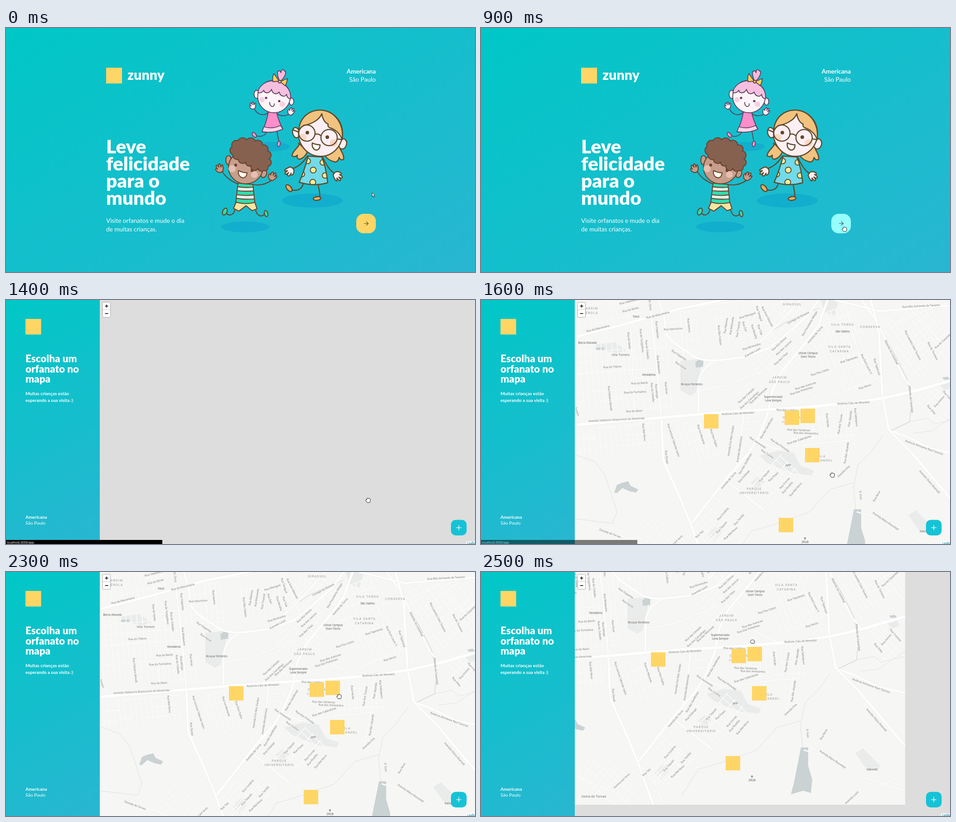
Animation, 1035 px wide and 541 px high, one loop 8 s. Source, as an HTML page:

```html
<!DOCTYPE html>
<html lang="pt-BR">
<head>
<meta charset="utf-8">
<title>Orfanatos</title>
<style>
html, body { margin: 0; width: 100%; height: 100%; overflow: hidden; }
body, #side { background: linear-gradient(329.54deg, #29b6d1 0%, #00c7c7 100%); }
svg, #app { position: absolute; left: 0; top: 0; width: 1035px; height: 541px; overflow: hidden; }
#app { background: #ddd; }
#side { position: absolute; left: 0; top: 0; width: 207px; height: 541px; }
text { font-family: Lato, sans-serif; fill: #fff; }
.title { font-weight: 900; }
.bold { font-weight: 700; }
.end { text-anchor: end; }
.kid { stroke-linecap: round; stroke-linejoin: round; }
.kid .line { fill: none; }
.flat { stroke: none; }
#map text { font: 6.3px Roboto, sans-serif; fill: #888; text-anchor: middle; paint-order: stroke; stroke: #f6f6f4; stroke-width: 1.4px; }
#map .area { font-size: 7px; letter-spacing: 1.2px; fill: #999; }
#map .place { fill: #666; }
#map .town { font-size: 7.8px; fill: #777; }
#roads, #paths { fill: none; stroke-linejoin: round; stroke-linecap: round; }
</style>
</head>
<body>
<svg id="landing" viewBox="0 0 1035 541">
  <defs>
    <path id="hand" vector-effect="non-scaling-stroke" d="M-3 8C-8 6-10 0-9-3C-8-6-5-4-5-2C-6-8-4-11-2-10C0-9 0-5 0-4C1-10 4-12 5-9C6-7 4-4 4-2C7-6 10-6 9-3C8 1 5 6 3 8Z"/>
    <clipPath id="dress"><path d="M667 284L697 286C704 303 708 325 710 343Q680 352 647 342C657 320 662 302 667 284Z"/></clipPath>
    <clipPath id="shirt"><path d="M512 344L545 347L549 387Q528 392 507 386Z"/></clipPath>
  </defs>

  <rect x="221" y="88" width="35" height="35" fill="#ffd666"/>
  <text class="title" x="268" y="115" font-size="30.3">zunny</text>
  <text class="bold end" x="816" y="101" font-size="13.5">Americana</text>
  <text class="end" x="816" y="119" font-size="13.7">São Paulo</text>
  <g class="title" font-size="42.2">
    <text x="221" y="278">Leve</text><text x="221" y="316">felicidade</text>
    <text x="221" y="354">para o</text><text x="221" y="392">mundo</text>
  </g>
  <g font-size="13.5">
    <text x="221" y="432">Visite orfanatos e mude o dia</text>
    <text x="221" y="450.5">de muitas crianças.</text>
  </g>

  <g fill="#12aecd">
    <ellipse cx="583" cy="263" rx="43" ry="10.5"/>
    <ellipse cx="676" cy="382.5" rx="67" ry="15.5"/>
    <ellipse cx="528" cy="441" rx="53" ry="12"/>
  </g>

  <g class="kid" stroke="#5f3f5e" stroke-width="1.8" fill="#fdf5f8">
    <path class="line" d="M579 187C570 196 556 193 549 181M597 189C606 197 617 195 625 191M575 231C571 240 560 242 553 239M598 230L602 251"/>
    <g fill="#fb9dd0">
      <ellipse cx="548" cy="237" rx="3.5" ry="6.5" transform="rotate(-38 548 237)"/>
      <ellipse cx="602" cy="257" rx="3.2" ry="6" transform="rotate(10 602 257)"/>
    </g>
    <use href="#hand" transform="translate(545 173) rotate(-25) scale(.8)"/>
    <use href="#hand" transform="translate(629 186) rotate(20) scale(.8 .9)"/>
    <path fill="#ff8ecb" d="M579 186L597 187Q602 208 611 224Q590 234 565 230Q575 210 579 186Z"/>
    <path fill="#fbd6ea" d="M569 219Q588 225 606 216L611 224Q590 234 565 230Z"/>
    <ellipse cx="553" cy="147" rx="5.5" ry="9"/><ellipse cx="630" cy="163" rx="5" ry="8"/>
    <path fill="#f9b8dd" d="M603 116C599 106 597 96 602 95C605 94 606 97 607 99C607 92 612 90 614 95C618 95 618 101 615 106C613 111 609 115 606 118Z"/>
    <circle cx="591.5" cy="152" r="36"/>
    <path fill="#f5bfe0" d="M556 143C558 127 575 116 593 117C615 119 630 137 628 157C622 157 620 153 619 147C616 154 605 152 603 142C596 149 588 146 586 136C580 147 570 145 569 138Q563 146 556 143Z"/>
    <path fill="#ffd152" d="M603 118L591 101C588 108 588 113 589 119ZM605 119L621 112C620 119 619 124 616 128Z"/>
    <circle cx="604" cy="119" r="3" fill="#ffd152"/>
    <g class="flat" fill="#f9cfe0"><circle cx="565" cy="159" r="5.8"/><circle cx="610" cy="169" r="6"/></g>
    <g class="flat" fill="#5f3f5e"><circle cx="574" cy="155" r="2.6"/><circle cx="603" cy="162" r="2.6"/></g>
    <path class="line" d="M582 165C581 176 593 177 592 168"/>
  </g>

  <g class="kid" stroke="#5f4a2b" stroke-width="2.5" fill="#fdeff3">
    <path class="line" d="M665 284C658 296 645 308 634 311M699 287C706 302 715 316 724 322M656 345C653 357 645 362 630 359M689 346C690 358 694 366 692 376"/>
    <g fill="#e9ae62">
      <ellipse cx="624.5" cy="355" rx="9" ry="4.8" transform="rotate(50 624.5 355)"/>
      <ellipse cx="686.5" cy="378" rx="8.5" ry="4" transform="rotate(-8 686.5 378)"/>
    </g>
    <use href="#hand" transform="translate(626 317) rotate(215) scale(1.1)"/>
    <use href="#hand" transform="translate(731 328) rotate(125) scale(1.1)"/>
    <path fill="#f2c27f" d="M646 255C650 264 634 268 631 283Q637 288 643 282Q641 290 647 291C655 290 661 283 665 275ZM738 262C735 272 747 277 745 291Q739 295 735 287Q733 297 726 297C718 295 709 292 704 283C712 279 716 270 716 262Z"/>
    <g clip-path="url(#dress)">
      <rect x="640" y="280" width="75" height="70" fill="#71dbe9"/>
      <g fill="#fdeb9c" stroke-width="2">
        <circle cx="666" cy="295" r="6"/><circle cx="699" cy="298" r="6"/><circle cx="678" cy="315" r="6.5"/>
        <circle cx="653" cy="324" r="6"/><circle cx="704" cy="327" r="6"/><circle cx="677" cy="342" r="6.5"/>
      </g>
    </g>
    <path class="line" d="M667 284L697 286C704 303 708 325 710 343Q680 352 647 342C657 320 662 302 667 284Z"/>
    <ellipse cx="640" cy="232" rx="7.5" ry="11.5" transform="rotate(-12 640 232)"/>
    <ellipse cx="743" cy="257" rx="8.5" ry="11.5" transform="rotate(15 743 257)"/>
    <ellipse cx="694" cy="233.5" rx="48.5" ry="51"/>
    <path fill="#f2c27f" d="M646 229C647 200 668 181 695 182C725 184 746 211 742 248C737 232 724 224 714 221Q709 218 711 213C703 210 698 200 697 190C691 206 670 214 657 216Q650 220 646 229Z"/>
    <g class="flat" fill="#fcd6c2"><circle cx="655" cy="243" r="8"/><circle cx="723" cy="255" r="8.5"/></g>
    <path class="line" d="M682 236Q688 233 695 239M731 246L739 247M646 231L634 226"/>
    <circle class="line" cx="664" cy="233" r="18"/><circle class="line" cx="713" cy="243" r="18"/>
    <g class="flat" fill="#5f4a2b"><circle cx="665" cy="232" r="4"/><circle cx="709" cy="242" r="4"/></g>
    <path fill="#fff" d="M676 255Q685 259 693 259C693 269 687 272 682 270C677 267 675 261 676 255Z"/>
  </g>

  <g class="kid" stroke="#6a4430" stroke-width="2.2" fill="#c69e8b">
    <path class="line" d="M510 345C497 340 484 330 477 318M546 347C560 350 574 346 586 338M505 403C503 415 492 418 486 410M551 404C555 420 566 418 570 413"/>
    <g fill="#2cdcaa">
      <ellipse cx="483" cy="407" rx="4.8" ry="8" transform="rotate(25 483 407)"/>
      <ellipse cx="574" cy="411.5" rx="3.8" ry="7" transform="rotate(-15 574 411.5)"/>
    </g>
    <use href="#hand" transform="translate(472 312) rotate(-30)"/>
    <use href="#hand" transform="translate(588 330) rotate(20)"/>
    <path fill="#f9e5a0" d="M508 386L549 386L554 401L543 405L530 394L514 406L502 400Z"/>
    <g clip-path="url(#shirt)">
      <rect x="500" y="340" width="55" height="52" fill="#2cdfb0"/>
      <path fill="#ebebe8" d="M500 350Q528 356 555 352V360Q528 364 500 359ZM500 368Q528 374 555 369V378Q528 382 500 376Z"/>
    </g>
    <path class="line" d="M512 344L545 347L549 387Q528 392 507 386Z"/>
    <ellipse cx="491" cy="293" rx="6" ry="10"/><ellipse cx="569" cy="323" rx="6" ry="9" transform="rotate(20 569 323)"/>
    <ellipse cx="529" cy="309" rx="38" ry="36.5"/>
    <path fill="#87614f" d="M501 281A10 10 0 0 1 499 263A10 10 0 0 1 512 250A11 11 0 0 1 531 248A11 11 0 0 1 550 251A10 10 0 0 1 566 260A9 9 0 0 1 577 273A9 9 0 0 1 580 290A9 9 0 0 1 578 307A7 7 0 0 1 569 316A8 8 0 0 1 556 311A8 8 0 0 1 541 305A8 8 0 0 1 529 297A9 9 0 0 1 513 291A9 9 0 0 1 501 281Z"/>
    <g class="flat" fill="#e6bfb0"><circle cx="499" cy="312" r="8"/><circle cx="548" cy="325" r="7.5"/></g>
    <g class="flat" fill="#6a4430"><circle cx="507" cy="304" r="3.2"/><circle cx="543" cy="316" r="3.2"/></g>
    <path fill="#fff7e8" d="M513 316Q522 321 532 321C531 331 525 334 519 331C514 328 512 322 513 316Z"/>
  </g>

  <rect id="enter" x="773" y="412" width="43.2" height="43.2" rx="16"/>
  <path d="M790 433.5H799.5M795 429L799.5 433.5L795 438" fill="none" stroke="#000" stroke-opacity=".65" stroke-width="1.1"/>
</svg>

<div id="app">
  <svg viewBox="0 0 1035 541">
    <clipPath id="extent"><rect x="207" y="0" width="846" height="591"/></clipPath>
    <g id="map">
      <g id="tiles" clip-path="url(#extent)">
        <rect x="207" y="0" width="846" height="591" fill="#f6f6f4"/>
        <path fill="#eaeceb" d="M249 99L295 94L322 112L300 118L268 112ZM440 135L490 130L474 205L462 212L440 200ZM615 345L655 334L690 338L706 368L735 378L730 389L690 384L655 372L630 360ZM943 477L960 466L998 505L990 517L965 508ZM660 365L690 350L680 372ZM595 405L612 392L626 404L608 418ZM1010 185L1035 178L1040 195L1018 202ZM500 520L520 500L535 512L515 535ZM750 0L790 0L780 35L758 28Z"/>
        <path fill="#cad2d3" d="M294 427L300 410L312 405L325 402L330 412L347 420L342 427L328 424L312 417L300 428ZM823 464H839V505L848 535L845 565L828 560L801 568L807 545L817 495ZM473 138L481 132H491L490 148L474 150ZM250 106L272 105V110L254 111ZM1018 172L1030 170L1035 176L1022 177Z"/>
        <g id="paths"></g>
        <g id="roads"></g>
        <path d="M715 526V532M712.5 528H717.5" stroke="#555"/>
        <g id="labels"></g>
      </g>
      <g id="pins" fill="#ffd666"></g>
    </g>
    <rect x="213" y="5" width="17.5" height="33.5" rx="2" fill="#fff" stroke="#aaa"/>
    <path d="M213 21.5H230.5" stroke="#ccc"/>
    <path d="M218.5 13.5H225.5M222 10V17M218.5 30H225.5" stroke="#000" stroke-width="1.4"/>
    <rect x="1015" y="535" width="20" height="6" fill="#fff" fill-opacity=".7"/>
    <text x="1017.5" y="541.5" font-size="6.3" style="font-family:Roboto,sans-serif;fill:#0078a8">Leaflet</text>
    <rect x="982" y="487.5" width="34.5" height="34.5" rx="10.5" fill="#15c3d6"/>
    <path d="M993.5 504.8H1005M999.25 499V510.5" stroke="#fff" stroke-width="1.3"/>
  </svg>
  <div id="side"></div>
  <svg viewBox="0 0 1035 541">
    <rect x="43" y="42" width="34.5" height="34.5" fill="#ffd666"/>
    <g class="title" font-size="22.4">
      <text x="43" y="138">Escolha um</text><text x="43" y="160.5">orfanato no</text><text x="43" y="183">mapa</text>
    </g>
    <g class="bold" font-size="10">
      <text x="43" y="211">Muitas crianças estão</text><text x="43" y="226">esperando a sua visita :)</text>
      <text x="43" y="484.5">Americana</text>
    </g>
    <text x="43" y="497.5" font-size="10.3">São Paulo</text>
  </svg>
</div>

<svg viewBox="0 0 1035 541">
  <g id="status"><rect y="532" width="345" height="9"/>
    <text x="2" y="540" font-size="6.7" style="font-family:'Noto Sans',sans-serif">localhost:3000/app</text></g>
  <g fill="#fff" stroke="#222" stroke-linejoin="round">
    <path id="arrow" stroke-width=".9" d="M0 0V9L2 7.2L3.5 10.5L5 9.8L3.5 6.7H6Z"/>
    <path id="open" d="M-2 5L-5 1C-6-1-4-2-3 0V-3C-3-5-1.5-5-1.3-3.5C-1-5.5 .8-5.5 1-3.7C1.5-5 3-4.5 3-3C4-4 5-3 5-2V2L3.5 5Z"/>
    <path id="closed" d="M-2.5 4L-4.5 1.5V-.5L-3-2C-2.5-4-.5-4-.3-3C.5-4 2-3.7 2.2-2.8C3.5-3.3 4.5-2 4.5-1V2L3.5 4Z"/>
  </g>
</svg>

<script>
const $ = id => document.getElementById(id);
const add = (id, markup) => $(id).insertAdjacentHTML('beforeend', markup);

// Faint blocks of parallel streets
function grid(x, y, w, h, angle, gapX = 12, gapY = 22) {
  let d = '';
  for (let i = -w / 2; i <= w / 2; i += gapX) d += `M${i} ${-h / 2}v${h}`;
  for (let j = -h / 2; j <= h / 2; j += gapY) d += `M${-w / 2} ${j}h${w}`;
  add('paths', `<g transform="translate(${x} ${y}) rotate(${angle})">
    <path d="${d}" stroke="#ececea" stroke-width="1.8"/><path d="${d}" stroke="#fff" stroke-width="1.2"/></g>`);
}
grid(285, 165, 150, 150, -5);
grid(285, 30, 140, 60, -14);
grid(445, 70, 80, 90, -5);
grid(385, 165, 60, 160, -5);
grid(570, 55, 100, 80, -5);
grid(675, 55, 100, 90, -52);
grid(655, 145, 80, 90, 45);
grid(800, 110, 110, 180, -22);
grid(965, 85, 120, 150, -35);
grid(600, 210, 70, 50, -42);
grid(760, 275, 150, 75, -4);
grid(650, 400, 100, 60, -47);
grid(300, 310, 170, 60, -5);
grid(480, 310, 70, 90, -18);
grid(535, 495, 80, 100, 42);
grid(1010, 230, 60, 80, -45);
grid(400, 540, 130, 70, 40);
grid(580, 370, 60, 60, -52);

const thin = (d, color = '#dfe1e0', width = 1) => add('paths', `<path d="${d}" stroke="${color}" stroke-width="${width}"/>`);
thin('M207 343L250 358L272 385L286 425L300 470L290 495L207 485');
thin('M887 300L862 335L832 365L822 415L827 464M822 405L770 420L725 470L640 500L597 512L560 570');
thin('M945 270L985 262L1000 275L1053 262M1053 250L995 290L955 295', '#e2e2e2');
thin('M887 75L915 125L940 175L950 225L946 270L900 292', '#d3dadb', 1.4);
thin('M640 70L672 50L720 28L745 18', '#d3dadb', 1.2);

const road = (width, d) => add('roads', `<path d="${d}" stroke="#e9eae9" stroke-width="${width + 1}"/><path d="${d}" stroke="#fff" stroke-width="${width}"/>`);
road(2, 'M408 75L470 128M480 200L540 190L640 150M660 165L720 205L780 235M440 20L447 130M610 0L650 90M800 0L842 150L890 215');
road(2, 'M580 285L604 288L640 315M583 272L610 268L628 290M594 305L650 330L740 318L820 310M810 240L806 310L790 385M480 262L497 330');
road(2, 'M463 497L500 541L520 591M510 435L560 470L500 540M830 470L900 490L960 530L1053 560M1053 520L925 591M207 487L260 510L330 529L400 560');
road(2, 'M330 50L340 260M207 165L400 150M440 20L620 -5M880 60L1035 5M915 140L1035 70M960 30L1053 140');
road(3, 'M371 0L378 60L388 150L398 258M580 250L572 320L562 375M705 0L640 70L580 127');
road(3.5, 'M408 75L405 40L392 0M480 250L480 185Q483 150 520 134M547 405L627 468M840 0L872 45L935 175L960 205M780 0L830 12L880 25L1035 12');
road(4, 'M898 288L940 303L990 328L1053 343');
road(4, 'M408 75L425 95L470 125Q490 137 530 133L580 127L635 107L675 75L720 35L745 0');
road(4.5, 'M765 0L745 55L720 90L662 160L643 200L632 255L612 305L590 340L545 392L463 497');
road(4.5, 'M398 258L402 355L440 440L463 497L497 591M860 0L878 70L886 215L900 288L950 338L1010 410L1053 460');
road(5, 'M207 82L300 58L380 36L440 19L520 3L560 -4');
road(6, 'M207 277L395 261L560 247L700 239L820 228L890 217L960 201L1053 174');

// Labels that share an angle
const labels = (angle, items, kind = '') => items.forEach(([name, x, y]) =>
  add('labels', `<text class="${kind}" transform="translate(${x} ${y}) rotate(${angle})" y="2.3">${name}</text>`));

labels(0, [['JARDIM', 242, 19], ['PÉROLA', 242, 29], ['GIRASSOL', 687, 10], ['VILA TORDO', 798, 55], ['CONSERVA', 859, 60],
  ['VILA SANTA', 791, 104], ['CATARINA', 791, 114], ['JARDIM', 659, 172], ['SÃO PAULO', 659, 182], ['CHÁCARA', 686, 261],
  ['JARDIM', 680, 270], ['VILA', 751, 347], ['BRANDEL', 757, 356], ['PARQUE', 603, 419], ['UNIVERSITÁRIO', 603, 428]], 'area');
labels(0, [['Tavol', 342, 37], ['Barca Atacado', 235, 95], ['Vendalima', 370, 166], ['Bosque Botânico', 465, 187], ['São Valério', 798, 70],
  ['Univar Campus', 722, 118], ['Dom Tércio', 722, 126], ['Supermercado', 645, 215], ['Leva Sempre', 645, 223], ['APP', 678, 367],
  ['ZRUB', 715, 537], ['Saborelli', 980, 513]], 'place');
labels(0, [['Vila Torrem', 308, 122], ['Usina de Torvas', 366, 573]], 'town');

labels(-14, [['Rua da Marcenária', 258, 63], ['Rua da Marcenária', 390, 33], ['Rua Valdorense', 327, 3], ['Rua do Bórax', 330, 21]]);
labels(-3, [['Rua Itarumirim', 424, 64], ['Rua do Titânio', 290, 148], ['Rua do Berilo', 350, 184], ['Rua da Turmalina', 340, 204],
  ['Rua do Neon', 338, 246], ['Rodovia Caio de Mirandol', 567, 251], ['Rodovia Caio de Mirandol', 822, 228],
  ['Avenida Valdomiro Brancovich de Almerinda', 299, 265], ['Rua Nilo Armando de Tavares', 971, 13]]);
labels(2, [['Rua das Lobélias', 676, 244], ['Rua das Verbenas', 701, 288], ['Rua dos Amarantos', 717, 295]]);
labels(-18, [['Rua das Calêndulas', 702, 310], ['Rua das Avencas', 716, 190], ['Rua dos Pinheirais', 707, 201], ['Rua Pau Cetim', 748, 160],
  ['Rua Nicarauba', 597, 103], ['Rua Maraguá', 588, 34], ['Rua Tapirandu', 812, 132], ['Rua Xerús', 847, 192]]);
labels(-28, [['Avenida Lusol', 599, 116], ['Córrego do Bosque', 700, 39]]);
labels(-43, [['Rua dos Olmos', 658, 97], ['Rua dos Juncos', 668, 106], ['Rua das Tílias', 662, 130], ['Rua das Cerejais', 585, 212],
  ['Rua dos Carvalhais', 592, 222], ['Rua das Mimosas', 612, 212], ['Rua do Carpinteiro', 1021, 89], ['Avenida Orla', 800, 380],
  ['Rua Pirani', 645, 392], ['Rua Mel Novo', 551, 517], ['Rua Taú', 482, 519], ['Acesso por terra', 427, 538], ['Avenida Lusol', 935, 575]]);
labels(-49, [['Avenida de Torva', 737, 77], ['Avenida de Torva', 546, 400], ['Rua Solanga', 580, 391], ['Rua Taquari', 625, 390],
  ['Rua Corvas', 670, 406], ['Rua Rosélia', 676, 416], ['Rua Mel Novo', 694, 420], ['Rua Coralina', 534, 474], ['Rua Taquari', 531, 504],
  ['Rua Tandiá', 569, 487], ['Rua Aurora', 1011, 225]]);
labels(-60, [['Rua Presidente Melgar', 725, 52], ['Rua das Gardênias', 630, 284], ['Rua das Gardênias', 583, 363], ['Rua Nove', 873, 435]]);
labels(-81, [['Avenida Frei Nilo Vardan', 551, 312], ['Avenida Montelvinos', 570, 331], ['Rua das Jaçanãs', 806, 339], ['Rua Jaçanãs', 814, 263],
  ['Rua dos Tuiuiús', 792, 275], ['Rua Malvina', 540, 57], ['Rua Belzonela', 553, 57], ['Rua Tropical', 567, 65]]);
labels(84, [['Rua do Zinco', 373, 5], ['Rua Itavera', 459, 56], ['Rua São Calisto', 527, 78], ['Rua Viajantes', 389, 66], ['Rua da Opala', 327, 90],
  ['Rua do Tungstênio', 355, 90], ['Rua do Cobalto', 367, 110], ['Rua Ibitaquera', 392, 143], ['Rua do Cobalto', 379, 205],
  ['Rua Iatinga', 388, 202], ['Rua Itoraí', 409, 195], ['Rua Fabiano Morelli', 285, 218], ['Rua Mel Novo', 360, 293], ['Rua Zenaíl', 410, 348],
  ['Rua Falcão', 765, 267], ['Rua Sabiapuru', 828, 260], ['R. Dois', 838, 433], ['Ribeirão do Carambel', 949, 220]]);
labels(72, [['Torrem', 212, 247], ['Rua Leonora Taborda Velim', 425, 311], ['Rua Ivo Morante', 486, 298], ['Rua Davi Salim', 514, 306],
  ['Rua Zari', 582, 59], ['Rua Nevália', 603, 70], ['Rua Tule', 616, 66], ['Rua Taraguá', 614, 30], ['Rua Taperuçá', 874, 148]]);
labels(63, [['Rua Dom Marcelo', 632, 37], ['Rua Dom Lauro V', 851, 142], ['Rua Leandro Caio Tavares', 953, 100], ['Ribeirão do Carambel', 906, 116],
  ['Rua do Torneiro', 997, 113]]);
labels(49, [['Avenida Otávio Bramelli', 990, 403], ['Rua Cometa', 1032, 215], ['Rua Orbe', 994, 243]]);
labels(34, [['Rua Viajantes', 437, 122], ['Rua Itaroé', 441, 145], ['Rua das Prímulas', 660, 322], ['Rua Jacaranda', 611, 316],
  ['Rua Corália', 632, 341], ['Avenida Mário Bransfeld', 893, 490]]);
labels(20, [['Rodovia Almirante Raul Tavorini', 978, 327], ['Estrada de Torvas', 285, 517]]);

for (const [x, y] of [[508, 269], [686, 261], [721, 257], [731, 344], [673, 499]])
  add('pins', `<rect x="${x - 16}" y="${y - 16}" width="32" height="32"/>`);

const LOOP = 8000, HOVER = 800, PAGE = 1400, DRAG = 2400;
const pointerPath = [[100, 808, 365], [200, 811, 385], [300, 817, 418], [400, 821, 442], [500, 821, 453], [600, 823, 457], [700, 819, 456],
  [800, 809, 451], [900, 802, 446], [1000, 799, 444], [1400, 799, 444], [1500, 792, 426], [1700, 758, 350], [2000, 742, 304],
  [2300, 735, 276], [2400, 666, 197], [2500, 599, 154]];
const dragPath = [[2300, 0, 0], [2400, -50, -32], [2500, -117, -75]];
const statusFade = [[1500, 1], [1600, .5], [1700, .07], [1800, 0]];
const tileFade = [[1400, 0], [1600, 1]];
const hoverFade = [[700, 0], [900, 1]];

function sample(path, t) {
  const next = path.findIndex(key => key[0] > t);
  if (next === 0) return path[0].slice(1);
  if (next < 0) return path[path.length - 1].slice(1);
  const a = path[next - 1], b = path[next], p = (t - a[0]) / (b[0] - a[0]);
  return a.slice(1).map((v, i) => v + (b[i + 1] - v) * p);
}
const show = (id, visible) => { $(id).style.display = visible ? '' : 'none'; };
const mix = (a, b, p) => `rgb(${a.map((v, i) => Math.round(v + (b[i] - v) * p))})`;

function draw(now) {
  const t = Math.floor(now % LOOP / 100) * 100;
  const onMap = t >= PAGE;
  show('landing', !onMap);
  show('app', onMap);
  $('enter').setAttribute('fill', mix([255, 214, 102], [150, 254, 255], sample(hoverFade, t)[0]));

  show('status', t >= 1200);
  $('status').setAttribute('opacity', sample(statusFade, t)[0]);
  $('tiles').setAttribute('opacity', sample(tileFade, t)[0]);
  show('pins', t > PAGE);
  $('map').setAttribute('transform', `translate(${sample(dragPath, t)})`);

  show('arrow', t < HOVER);
  show('open', t >= HOVER && t < DRAG);
  show('closed', t >= DRAG);
  for (const id of ['arrow', 'open', 'closed']) $(id).setAttribute('transform', `translate(${sample(pointerPath, t)})`);
}

const start = performance.now();
function frame() {
  draw(performance.now() - start);
  requestAnimationFrame(frame);
}
frame();
</script>
</body>
</html>
```
